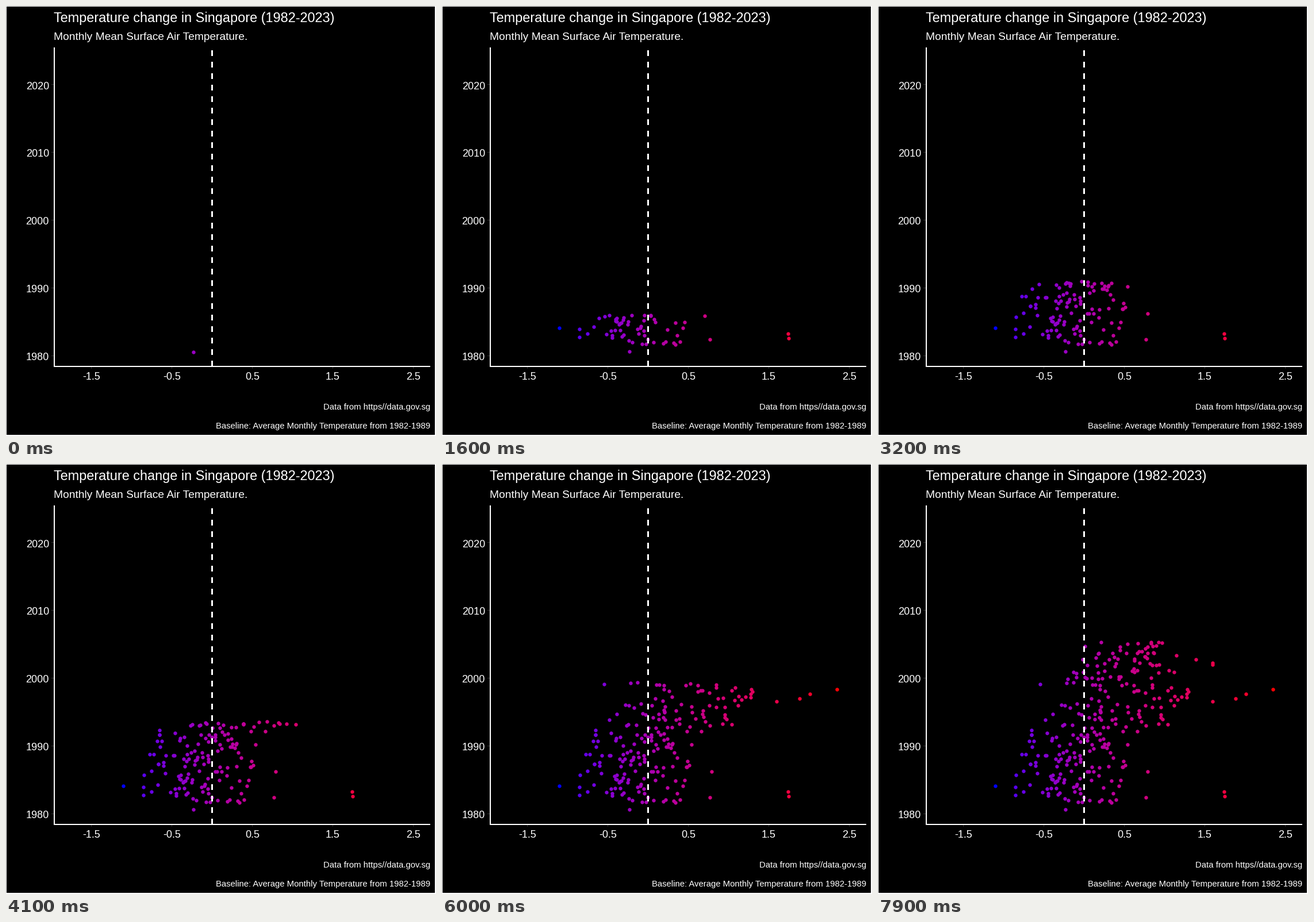
Recreate the animation shown at these times as a matplotlib script. Size 748 by 748 pixels, loop 8000 ms.

```python
import numpy as np
import matplotlib.pyplot as plt
from matplotlib.animation import FuncAnimation
from matplotlib.patches import Rectangle

SIZE, DPI = 748, 100
FRAMES, INTERVAL = 80, 100
START, END, SPAN, STEPS = 1981, 2005, 42, 139   # the full run covers 42 years
ZERO_X, DEG_W = 358.3, 140
Y1980, YEAR_H = 608.6, 11.79
SCATTER, JITTER = 0.43, 0.4

# Mean anomaly in degrees at a few turning points
TREND = [(1982, 0.19), (1984, -0.38), (1987, 0.15), (1989, -0.25), (1993, 0.30),
         (1996, 0.30), (1997.4, 1.15), (1999, 0.27), (2002, 0.83), (2005, 0.73)]
EXTREMES = {1983: [1.75, 1.74], 1984: [-1.10], 1997: [1.88], 1998: [2.35, 2.01]}


def to_stage(deg, year):
    return np.column_stack([ZERO_X + DEG_W * deg, Y1980 - YEAR_H * (year - 1980)])


def build_years():
    """One array of points per year, rows in month order."""
    rng = np.random.default_rng(7)
    years = [to_stage(np.array([-0.23]), np.array([1980.65]))]
    for year in range(START + 1, END + 1):
        spread = np.clip(rng.normal(size=12), -1.9, 1.9) * SCATTER
        deg = np.clip(np.interp(year, *zip(*TREND)) + spread, -0.85, 1.6)
        top = EXTREMES.get(year, [])
        deg[:len(top)] = top
        years.append(to_stage(deg, year + rng.uniform(-JITTER, JITTER, 12)))
    return years


def lab_ramp(x):
    """Blue to red, mixed in CIE Lab."""
    t = np.clip((np.asarray(x) - 205) / 485, 0, 1)[:, None]
    blue, red = np.array([32.30, 79.19, -107.86]), np.array([53.24, 80.09, 67.20])
    L, a, b = (blue + (red - blue) * t).T
    fy = (L + 16) / 116
    f = np.array([fy + a / 500, fy, fy - b / 200])
    xyz = np.where(f > 6 / 29, f ** 3, (f - 4 / 29) * 3 * (6 / 29) ** 2)
    xyz *= np.array([[0.95047], [1.0], [1.08883]])
    to_rgb = np.array([[3.2406, -1.5372, -0.4986],
                       [-0.9689, 1.8758, 0.0415],
                       [0.0557, -0.2040, 1.0570]])
    lin = np.clip(to_rgb @ xyz, 0, 1)
    rgb = np.where(lin > 0.0031308, 1.055 * lin ** (1 / 2.4) - 0.055, 12.92 * lin)
    return np.clip(rgb.T, 0, 1)


YEARS = build_years()
KEYS = [round(i * STEPS / SPAN) for i in range(len(YEARS))]

fig = plt.figure(figsize=(SIZE / DPI, SIZE / DPI), dpi=DPI, facecolor="black")
ax = fig.add_axes([0, 0, 1, 1])
ax.set(xlim=(0, SIZE), ylim=(SIZE, 0))
ax.axis("off")


def box(x, y, w, h, color="white", z=1):
    ax.add_patch(Rectangle((x, y), w, h, fc=color, lw=0, aa=False, zorder=z))


def label(x, y, s, px, ha="left"):
    ax.text(x, y, s, color="white", family="Liberation Sans",
            fontsize=px * 72 / DPI, ha=ha, va="baseline")


# Outer frame
box(0, 0, SIZE, 1)
box(0, 0, 1, SIZE)
box(0, SIZE - 2, SIZE, 2)
box(SIZE - 2, 0, 2, SIZE)

# Axes and ticks
for year in range(1980, 2021, 10):
    y = Y1980 - YEAR_H * (year - 1980)
    box(79, round(y) - 1, 4, 1, "#333333")
    label(75, y + 7.5, str(year), 18, "right")
for deg in np.arange(-1.5, 3):
    x = ZERO_X + DEG_W * deg
    box(round(x), 628, 1, 3, "#333333")
    label(x, 650, f"{deg:.1f}", 18, "center")
box(83, 72, 2, 556)
box(83, 626, 655, 2)

# Dashed zero line
for y in range(77, 620, 20):
    box(357, y, 3, 10, z=4)

label(83.5, 28, "Temperature change in Singapore (1982-2023)", 23.5)
label(83.5, 59, "Monthly Mean Surface Air Temperature.", 19.1)
label(738, 702, "Data from https//data.gov.sg", 14.9, "right")
label(738, 735, "Baseline: Average Monthly Temperature from 1982-1989", 14.9, "right")

dots = ax.scatter([], [], s=(6.4 * 72 / DPI) ** 2, linewidths=0, zorder=3)


def update(frame):
    last = max(i for i, key in enumerate(KEYS) if key <= frame)
    pts = YEARS[:last + 1]
    if frame > KEYS[last]:
        # months travel from one year to the next; earlier years stay
        t = (frame - KEYS[last]) / (KEYS[last + 1] - KEYS[last])
        old = YEARS[last]
        new = YEARS[last + 1][:len(old)]
        pts = pts + [old + (new - old) * t]
    pts = np.vstack(pts)
    dots.set_offsets(np.round(pts) + 0.5)
    dots.set_facecolor(lab_ramp(pts[:, 0]))
    return (dots,)


anim = FuncAnimation(fig, update, frames=FRAMES, interval=INTERVAL,
                     repeat=True, repeat_delay=0, blit=False)
plt.show()
```
